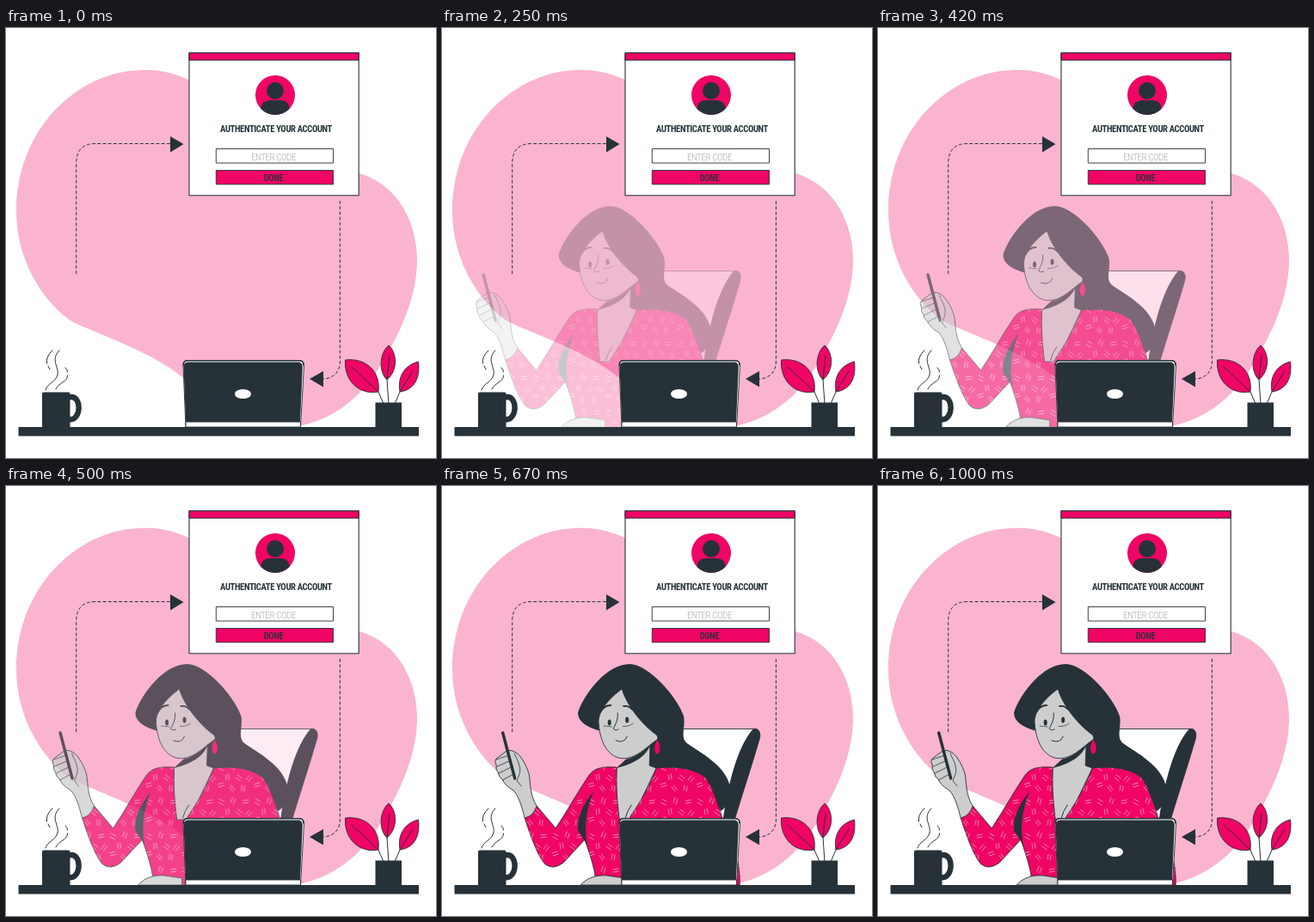
Animation, 500 px wide and 500 px high, one loop 1.04 s. Source, as an HTML page:

```html
<!DOCTYPE html>
<html lang="en">
<head>
<meta charset="utf-8">
<title>Authenticate your account</title>
<style>
  html, body { margin: 0; width: 100%; height: 100%; overflow: hidden; background: #fff; }
  svg { display: block; width: 100vw; height: 100vh; }
  .ink { fill: #263238; }
  .pink { fill: #f00464; }
  .skin { fill: #cdcdcd; }
  .white { fill: #fff; }
  .edge { stroke: #263238; stroke-width: .9; stroke-linejoin: round; }
  .line { fill: none; stroke: #263238; stroke-width: 1; stroke-linecap: round; stroke-linejoin: round; }
  .dash { fill: none; stroke: #263238; stroke-width: 1; stroke-dasharray: 3.8 2.4; }
  text {
    font-family: "Bebas Neue", "Roboto Condensed", "Open Sans Condensed", "Liberation Sans Narrow", "Noto Sans", sans-serif;
    font-stretch: extra-condensed; letter-spacing: -.035em; text-anchor: middle;
  }
</style>
</head>
<body>
<svg viewBox="0 0 500 500">
  <defs>
    <pattern id="dashes" width="42" height="40" patternUnits="userSpaceOnUse">
      <path d="M4 4l5 3M3 8l5 3M19 2l-2 6M22 4l-2 6M31 6l6-1M31 9l6-1M11 16l1 6M14 15l1 6M25 16l5 4M23 19l5 4M38 17l-4 5M41 19l-4 5M2 27l6-2M3 30l6-2M17 28l4 5M15 30l4 5M30 28l-1 6M33 29l-1 6"
        fill="none" stroke="#fff" stroke-width=".8" stroke-linecap="round" opacity=".65"/>
    </pattern>
    <clipPath id="disc"><circle cx="313" cy="78" r="23"/></clipPath>
    <path id="shirt" d="M203 327C186 326 177 328 171 336C158 355 146 377 132 398L110 372L96 386C103 408 112 432 120 440Q129 447 141 438L166 411C172 430 178 445 179 464H346C347 440 340 420 326 388C322 372 316 356 310 345C303 330 276 325 249 328C241 350 230 368 219 384L217 388H206C203 362 202 345 203 327Z"/>
  </defs>

  <path fill="#fab4d0" d="M155 49C190 47 225 60 250 90C290 140 360 155 411 169C455 182 478 225 478 270C478 300 468 335 446 374C425 415 395 450 345 462C290 475 240 437 205 406C170 377 112 358 78 342C46 322 12 273 12 213C12 120 80 52 155 49Z"/>

  <!-- dialog -->
  <rect class="white edge" x="213" y="29" width="197.200" height="165.700" style="stroke-width:1.1"/>
  <rect class="pink edge" x="213" y="29" width="197.200" height="8.300" style="stroke-width:1.1"/>
  <circle class="pink" cx="313" cy="78" r="23"/>
  <g class="ink" clip-path="url(#disc)">
    <circle cx="313" cy="73" r="10"/>
    <path d="M296 104V95Q297 84 307 84H319Q329 84 330 95V104Z"/>
  </g>
  <rect class="white edge" x="244.300" y="140.500" width="136.200" height="16.500"/>
  <rect class="pink edge" x="244.300" y="165.500" width="136.200" height="16.300"/>
  <text class="ink" x="314" data-y="117.500" data-w="130" font-weight="700">AUTHENTICATE YOUR ACCOUNT</text>
  <text fill="#aaa" x="311" data-y="150" data-w="52" font-weight="300">ENTER CODE</text>
  <text class="ink" x="311" data-y="174.500" data-w="22.500" font-weight="500">DONE</text>

  <g id="woman">
    <!-- chair -->
    <path class="white edge" d="M276 282.500H363C343 304 338 340 328 386H290Z"/>
    <path class="ink edge" d="M362 282.500C368 281 371 287 369 294C360 325 350 355 340 388H327C333 345 344 303 362 282.500Z"/>
    <!-- head -->
    <path class="ink" d="M218 207C192 207 166 240 158 263C157 274 170 282 186 285L240 330L300 335L324 378C333 372 337 360 335 350C330 325 300 310 286 300C276 293 283 283 281 268C274 246 240 207 218 207Z"/>
    <path class="skin edge" d="M242 297L241 325L249 328L220 389H206C202 365 202 345 203 328L214 318Z"/>
    <path class="ink" d="M203 328L214 318C228 314 236 306 243 299C237 316 222 323 203 328Z"/>
    <path class="skin edge" d="M209 236C195 246 180 262 182 277C184 298 192 312 205 316C222 320 235 306 247 297C253 294 251 290 246 287C232 276 215 256 209 236Z"/>
    <ellipse class="ink" cx="194.500" cy="275" rx="2" ry="3.500"/>
    <ellipse class="ink" cx="215" cy="272" rx="2" ry="3.500"/>
    <path class="line" style="stroke-width:1.8" d="M184 263C187 257 191 255 196 255M211 256Q217 255 221 260"/>
    <path class="line" d="M204 264C205 272 201 278 199 282Q201 285 205 283M202 296Q212 300 215 291"/>
    <path class="line" style="stroke-width:.7" d="M188 279L197 280M210 279.500Q217 280 222 276"/>
    <!-- body -->
    <use href="#shirt" class="pink edge"/>
    <use href="#shirt" fill="url(#dashes)"/>
    <path class="ink" d="M176 355C163 372 156 386 158 401L166 413L169 419C164 396 168 376 176 355Z"/>
    <path class="line" d="M220 371Q215 378 213 386"/>
    <path class="pink edge" d="M250 295C255 299 255 311 250 312C245 311 246 299 250 295Z"/>
    <path class="skin edge" d="M161 464C169 455 180 452 192 453L212 456V464Z"/>
    <!-- hand and phone -->
    <path class="skin edge" d="M96 386C93 375 90 362 83 354C76 350 72 346 70 341Q66 339 65 333Q62 330 63 325Q60 320 63 317L75 308Q81 306 86 310C92 314 98 325 101 335C103 347 102 360 110 372Q106 384 96 386Z"/>
    <path class="line" style="stroke-width:.8" d="M63 318L78 313M64 326L80 319M66 334L82 326M70 342L83 335M84 311C86 317 89 320 90 326C92 334 88 338 87 343L92 349"/>
    <path class="line" style="stroke-width:3.4" d="M70.500 287L84.500 340"/>
  </g>

  <!-- arrows -->
  <path class="dash" d="M81.700 286V157Q82 134.500 104 134.500H191M388.400 201V388C388.400 402 378 408 369 408"/>
  <path class="ink" d="M191 126L206.500 135L191 144.500ZM353 408L369 399V417.500Z"/>

  <!-- mug -->
  <path class="line" d="M62 375C51 386 62 394 60 403C58 412 48 413 46 421M54 375Q46 382 47.500 390M49 393L51 397M69 395Q72 398 71.500 400M71.500 404C72 412 61 412 58 420"/>
  <path class="line" style="stroke-width:6.400" d="M73 429.500C89 425 88 458 73 455"/>
  <path class="ink" d="M42 425Q42 423.500 44 423.500H72.500Q74.500 423.500 74.500 425V465H42Z"/>

  <!-- laptop -->
  <path class="white edge" d="M209 464L206 392Q206 386.500 211 386.500H341Q346.500 386.500 346.500 392L342.500 464Z"/>
  <path class="ink" d="M209 458L206.500 394Q207 388.500 212 388.500H340Q344.500 388.500 344.800 394L342 458Z"/>
  <path class="line" style="stroke-width:1.6" d="M206.300 392Q206.500 386.800 211 386.800H341Q346 386.800 346 392"/>
  <path class="white edge" d="M209 458H342.500V464H209Z"/>
  <ellipse class="white" cx="275.500" cy="425.500" rx="9.500" ry="5.500"/>

  <!-- plant -->
  <g class="pink edge">
    <path d="M394.500 386C418 383 436 399 433 423C411 427 393 411 394.500 386Z"/>
    <path d="M445 369C455 378 456 398 443 409C433 400 434 378 445 369Z"/>
    <path d="M479.500 388C482 408 474 421 458 423C455 406 463 392 479.500 388Z"/>
  </g>
  <path class="line" d="M402 394L433 423L439 437M446 381L443 409L445 437M473 399L458 423L452 437"/>
  <path class="ink" d="M429.500 435.500H460V465H429.500Z"/>

  <rect class="ink" x="14.500" y="464" width="465.500" height="10.500"/>
</svg>
<script>
  const LOOP = 1040, FRAMES = 25;
  const woman = document.getElementById('woman');

  // Choose the largest type size that keeps a label inside its line.
  function fit(label) {
    const max = 13.6;
    label.style.fontSize = max + 'px';
    const size = max * Math.min(1, label.dataset.w / label.getComputedTextLength());
    label.style.fontSize = size + 'px';
    label.setAttribute('y', +label.dataset.y + size * 0.355);
  }

  const startOf = n => Math.round(n * 12.5 / 3) * 10;

  function draw() {
    const t = performance.now() % LOOP;
    let n = FRAMES - 1;
    while (startOf(n) > t) n--;
    const shown = Math.min(1, Math.max(0, (n - 2.9) / 12.1));
    const sway = n > 15 ? 1 - Math.cos((n - 15) / 5 * Math.PI) : 0;
    woman.setAttribute('opacity', shown);
    woman.setAttribute('transform', `translate(${30 * (shown - 1) + sway})`);
    requestAnimationFrame(draw);
  }

  document.querySelectorAll('text').forEach(fit);
  draw();
</script>
</body>
</html>
```
